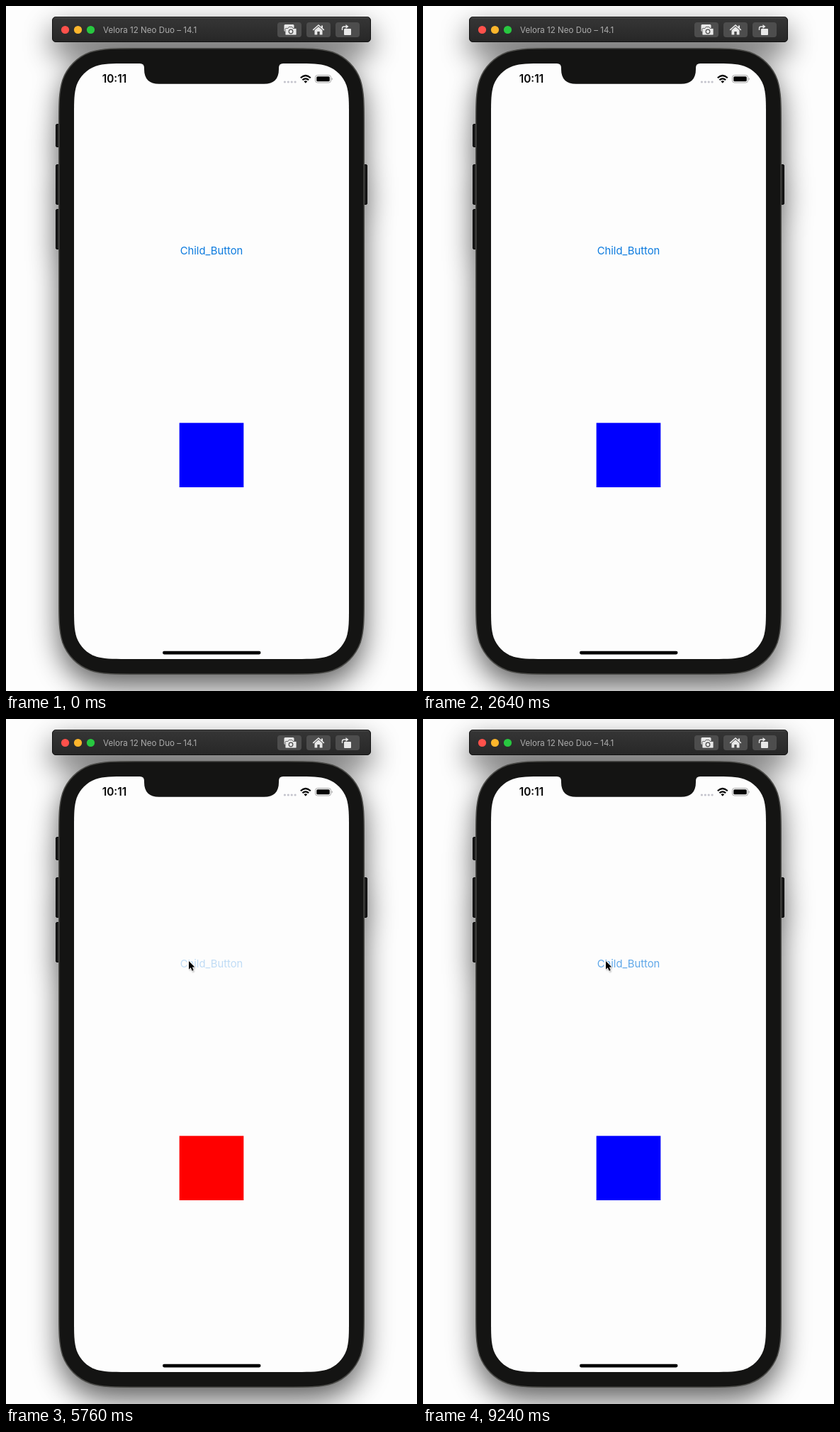
Recreate the animation shown at these times as an HTML page. Size 580 px wide and 965 px high, loop 9.26 s.

```html
<!DOCTYPE html>
<html lang="en">
<head>
<meta charset="utf-8">
<title>Button toggle</title>
<style>
  html, body { margin: 0; width: 100%; height: 100%; overflow: hidden; background: #fdfdfd; }
  svg { display: block; width: 580px; height: 965px; font-family: Inter, Roboto, sans-serif; }
</style>
</head>
<body>
<svg viewBox="0 0 580 965">
  <defs>
    <filter id="soft" x="-30%" y="-20%" width="160%" height="140%"><feGaussianBlur stdDeviation="20"/></filter>
    <filter id="tiny" x="-50%" y="-50%" width="200%" height="200%"><feGaussianBlur stdDeviation="1"/></filter>
    <linearGradient id="barFill" x2="0" y2="1">
      <stop stop-color="#363636"/><stop offset="1" stop-color="#272727"/>
    </linearGradient>
    <path id="body"/>
    <rect id="bar" x="65.5" y="15.5" width="449" height="35" rx="4.5"/>
    <g id="keys">
      <rect x="70.5" y="166.5" width="7" height="32" rx="1.5"/>
      <rect x="70.5" y="223.5" width="7" height="56" rx="1.5"/>
      <rect x="70.5" y="286.5" width="7" height="56" rx="1.5"/>
      <rect x="502.5" y="223.5" width="7" height="56" rx="1.5"/>
    </g>
    <path id="arrow" d="M0 0V11.8L2.7 9.3L4.6 13.8L6.8 12.9L4.9 8.4H8.4Z"/>
  </defs>

  <!-- shared window shadow -->
  <g transform="translate(0 17)" opacity=".63" filter="url(#soft)">
    <use href="#bar"/><use href="#body"/><use href="#keys"/>
  </g>

  <!-- title bar -->
  <use href="#bar" fill="url(#barFill)" stroke="#101010"/>
  <path d="M69 16.5H511" stroke="#505050"/>
  <circle cx="83.5" cy="33.5" r="5.6" fill="#ff514b"/>
  <circle cx="101.5" cy="33.5" r="5.6" fill="#fdb62c"/>
  <circle cx="119.5" cy="33.5" r="5.6" fill="#28c840"/>
  <text x="137" y="38" font-size="11.6" fill="#acacac">Velora 12 Neo Duo – 14.1</text>
  <g fill="#4d4d4d">
    <rect x="383" y="23" width="34" height="21" rx="4"/>
    <rect x="424" y="23" width="34" height="21" rx="4"/>
    <rect x="465" y="23" width="34" height="21" rx="4"/>
  </g>
  <g fill="#e8e8e8">
    <rect x="392.5" y="26" width="14" height="10" rx="1.5"/>
    <path d="M395 31.5H398L399.2 29.5H403.8L405 31.5H409Q410 31.5 410 32.5V40Q410 41 409 41H395Q394 41 394 40V32.5Q394 31.5 395 31.5Z" stroke="#4d4d4d" stroke-width=".8"/>
    <circle cx="402" cy="36" r="2.8" fill="none" stroke="#4d4d4d" stroke-width="1.2"/>
    <path d="M433.2 33.8L441 27L448.8 33.8" fill="none" stroke="#e8e8e8" stroke-width="1.6"/>
    <path d="M445 27.5H447V31H445ZM435.5 34L441 29.3L446.5 34V40.5H442.7V36H439.3V40.5H435.5Z"/>
    <rect x="477" y="32" width="10" height="9" rx="1"/>
    <path d="M474.5 34V31.5Q474.5 29 477 29H480" fill="none" stroke="#e8e8e8" stroke-width="1.4"/>
    <path d="M479.5 26L483.5 29L479.5 32Z"/>
  </g>

  <!-- phone -->
  <use href="#keys" fill="#1a1a1a" stroke="#080808"/>
  <use href="#body" fill="#141413" stroke="#4b4b48" stroke-width="1.5"/>
  <path id="screen" fill="#fdfdfd"/>
  <path d="M189 80V81Q195 81 195 87V89Q195 109.7 216 109.7H364Q385 109.7 385 89V87Q385 81 391 81V80Z" fill="#141413"/>

  <!-- status bar -->
  <text x="153" y="108.3" font-size="15.4" font-weight="600" text-anchor="middle" fill="#050505">10:11</text>
  <g fill="#c3c3cc">
    <circle cx="393.4" cy="107" r="1.6"/><circle cx="398.3" cy="107" r="1.6"/>
    <circle cx="403.2" cy="107" r="1.6"/><circle cx="408.1" cy="107" r="1.6"/>
  </g>
  <path d="M415.8 101.2Q422.8 94.8 429.8 101.2M418.4 104.2Q422.8 100.4 427.2 104.2" fill="none" stroke="#050505" stroke-width="2.2"/>
  <path d="M420.3 106.1Q422.8 104.2 425.3 106.1L422.8 108.7Z" fill="#050505"/>
  <rect x="436.5" y="97.5" width="22" height="10.5" rx="3" fill="none" stroke="#a8a8a8"/>
  <rect x="438.2" y="99.2" width="18.6" height="7.1" rx="1.6" fill="#050505"/>
  <path d="M459.7 101V104.5Q461 104 461 102.75Q461 101.5 459.7 101Z" fill="#a8a8a8"/>

  <!-- app -->
  <text id="label" x="290" y="349.8" font-size="14.8" text-anchor="middle" fill="#0b7ade">Child_Button</text>
  <rect id="box" x="244.65" y="587.3" width="90.7" height="90.7"/>
  <rect x="221" y="908.8" width="138.5" height="4.6" rx="2.3" fill="#050505"/>

  <g id="cursor">
    <use href="#arrow" x="1" y="2" opacity=".4" filter="url(#tiny)"/>
    <use href="#arrow" fill="#000" stroke="#fff" stroke-width="1.6" stroke-linejoin="round" paint-order="stroke"/>
  </g>
</svg>
<script>
const LOOP = 9260, HOLD = 140, FADE = 250, PRESSED = 0.25;
const taps = [5760, 6540, 7300, 7900, 8500, 9110];   // release times
const path = [[3250, -10, 392], [3800, 110, 362], [4450, 222, 338.5], [4650, 222, 338.5], [5000, 258, 341]];

const [label, box, cursor, body, screen] =
  ['label', 'box', 'cursor', 'body', 'screen'].map(id => document.getElementById(id));
const clamp = v => Math.min(1, Math.max(0, v));
const ease = v => v * v * (3 - 2 * v);

// Rectangle whose corners ease gradually into the straight sides.
function smoothRect(x, y, w, h, r) {
  const bend = [[0, 1.528], [0, 1.089], [0, .868], [.075, .631], [.169, .373],
    [.373, .169], [.631, .075], [.868, 0], [1.089, 0], [1.528, 0]];
  const corner = (right, bottom) => {
    const pts = bend.map(([a, b]) => [
      right ? x + w - a * r : x + a * r,
      bottom ? y + h - b * r : y + b * r
    ]);
    if (right !== bottom) pts.reverse();
    return pts[0] + 'C' + pts.slice(1).join(' ');
  };
  return `M${corner(0, 0)}L${corner(1, 0)}L${corner(1, 1)}L${corner(0, 1)}Z`;
}

function cursorAt(t) {
  let [, x, y] = path[0];
  for (let i = 1; i < path.length; i++) {
    const [t0, x0, y0] = path[i - 1], [t1, x1, y1] = path[i];
    const k = ease(clamp((t - t0) / (t1 - t0)));
    x += (x1 - x0) * k;
    y += (y1 - y0) * k;
  }
  return [x, y];
}

function labelOpacity(t) {
  if (taps.some(tap => t >= tap - HOLD && t < tap)) return PRESSED;
  const last = taps.filter(tap => tap <= t).pop();
  return last === undefined ? 1 : PRESSED + (1 - PRESSED) * ease(clamp((t - last) / FADE));
}

function draw(now) {
  const t = now % LOOP;
  const isRed = taps.filter(tap => tap <= t).length % 2;
  box.setAttribute('fill', isRed ? '#ff0000' : '#0000ff');
  label.setAttribute('opacity', labelOpacity(t));
  cursor.setAttribute('visibility', t < path[0][0] ? 'hidden' : 'visible');
  cursor.setAttribute('transform', `translate(${cursorAt(t)})`);
  requestAnimationFrame(draw);
}

body.setAttribute('d', smoothRect(74.75, 59.75, 430.5, 881.5, 70));
screen.setAttribute('d', smoothRect(96, 81, 388, 839, 48.4));
draw(0);
</script>
</body>
</html>
```
